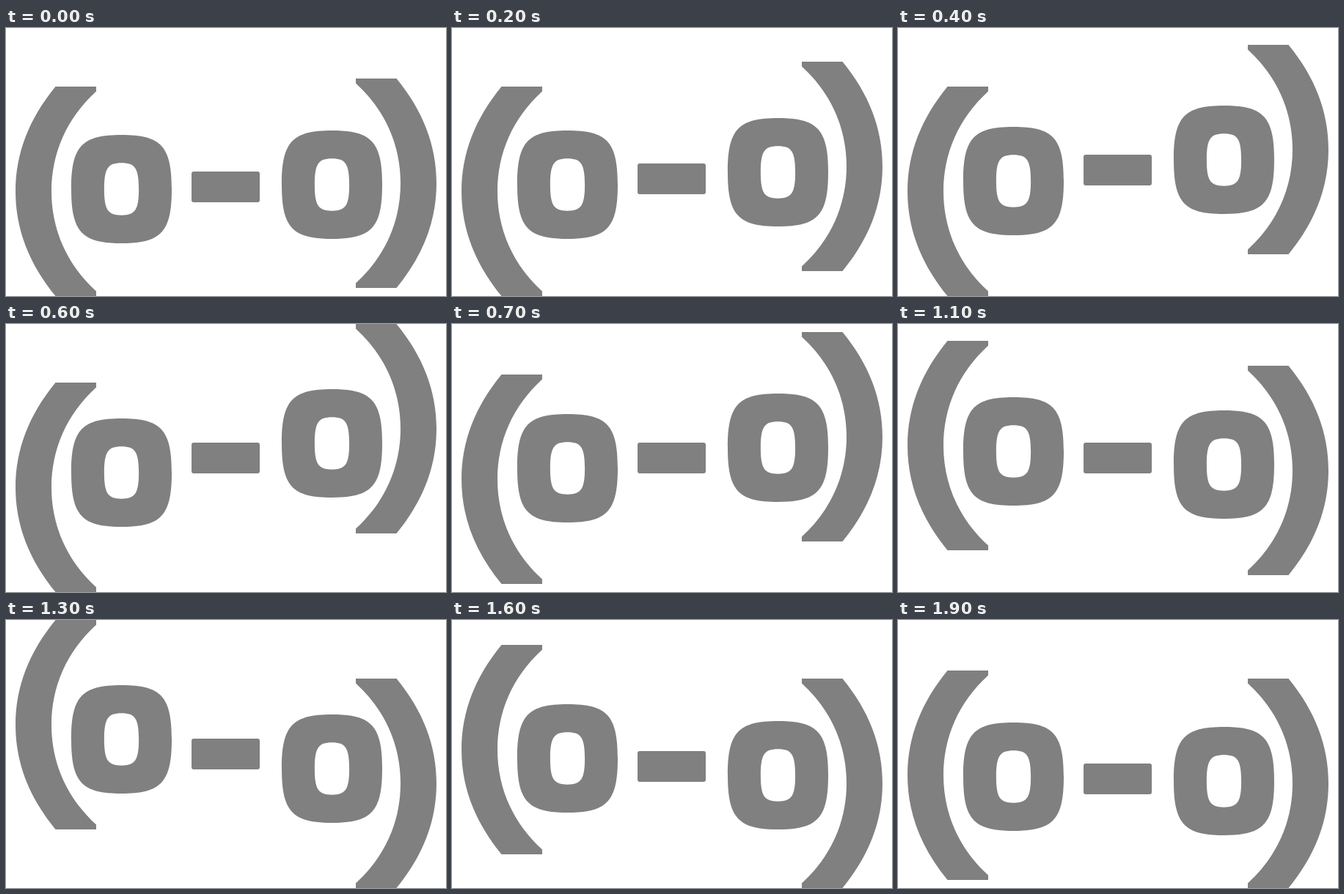
An HTML page that plays this animation: 600 px wide and 366 px high, repeating every 2 s.

```html
<!DOCTYPE html>
<html lang="en">
<head>
<meta charset="utf-8">
<title>(o-o)</title>
<style>
  html, body { margin: 0; width: 100%; height: 100%; overflow: hidden; background: #fff; }
  svg { display: block; width: 100%; height: 100%; fill: #808080; }
</style>
</head>
<body>
<svg viewBox="0 0 600 366">
  <defs>
    <path id="paren" d="M67.5 0H123V6.500C82 44 62 92 62 143S82 242 123 279.500V286H67.500C31.500 242 13 195 13 143S31.500 44 67.500 0Z"/>
    <path id="eye" fill-rule="evenodd"/>
  </defs>
  <g class="part"><use href="#paren"/></g>
  <g class="part"><use href="#eye" x="157.5"/></g>
  <g class="part"><rect x="253" width="93" height="42" rx="3"/></g>
  <g class="part"><use href="#eye" x="444.5"/></g>
  <g class="part"><use href="#paren" transform="matrix(-1 0 0 1 600 0)"/></g>
</svg>
<script>
  const FRAME_MS = 100, FRAMES = 20, RAMP = 7, LIFT = 80;
  const REST_Y = [80, 149, 202, 149, 80];
  const parts = document.querySelectorAll('.part');

  // Rounded-square ring outline, centred horizontally on x = 0.
  function squircle(rx, ry, cy) {
    const k = 0.79, a = rx * k, b = ry * k;
    return `M0 ${cy - ry}C${a} ${cy - ry} ${rx} ${cy - b} ${rx} ${cy}` +
      `S${a} ${cy + ry} 0 ${cy + ry}S${-rx} ${cy + b} ${-rx} ${cy}` +
      `S${-a} ${cy - ry} 0 ${cy - ry}Z`;
  }
  document.getElementById('eye').setAttribute('d',
    squircle(68.5, 74, 74) + squircle(23.6, 35.7, 74));

  // Linear rise and fall, wrapped around the loop.
  function pulse(frame, peak) {
    const gap = Math.abs(frame - peak);
    return Math.max(0, 1 - Math.min(gap, FRAMES - gap) / RAMP);
  }

  function draw() {
    const frame = Math.floor(performance.now() / FRAME_MS) % FRAMES;
    const left = pulse(frame, 13), right = pulse(frame, 6);
    parts.forEach((part, i) => {
      const mix = i / (parts.length - 1);
      const lift = LIFT * (left * (1 - mix) + right * mix);
      part.setAttribute('transform', `translate(0 ${Math.round(REST_Y[i] - lift)})`);
    });
    requestAnimationFrame(draw);
  }
  draw();
</script>
</body>
</html>
```
